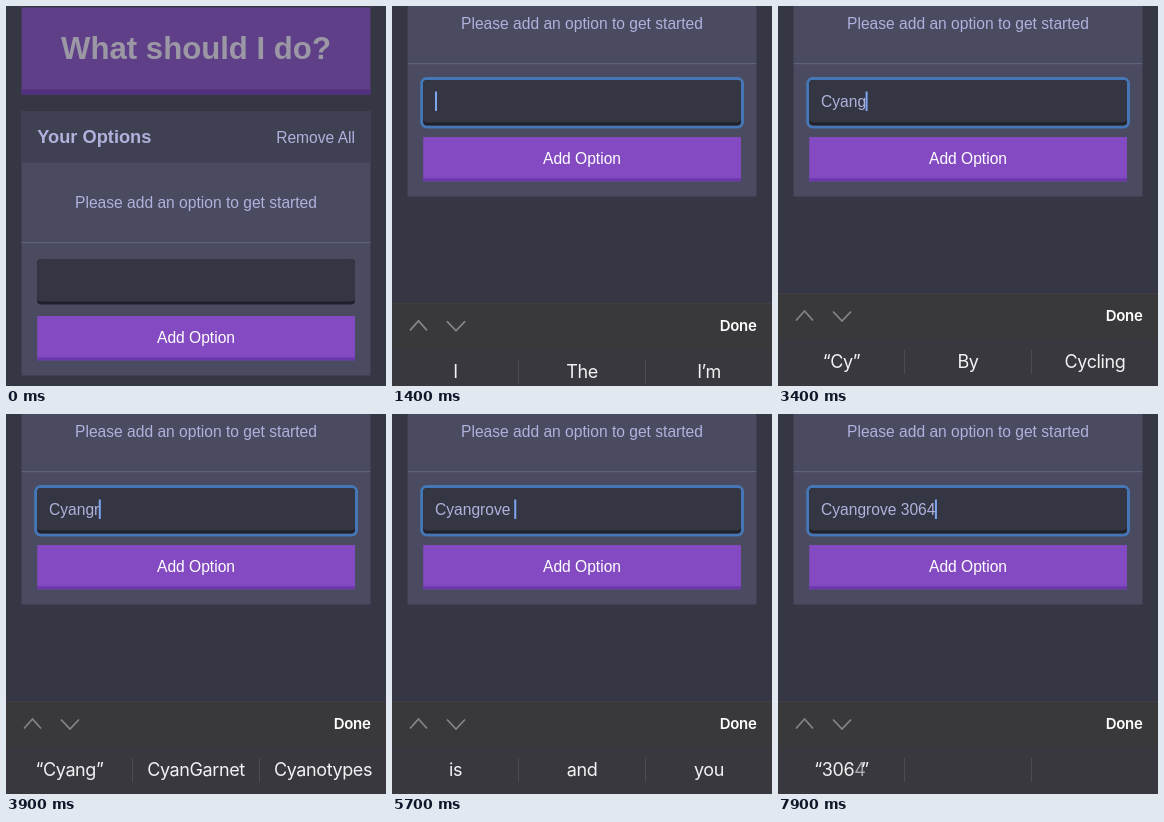
Animation, 380 px wide and 380 px high, one loop 8000 ms. Source, as an HTML page:

```html
<!DOCTYPE html>
<html lang="en">
<head>
<meta charset="utf-8">
<title>What should I do?</title>
<style>
  html, body { margin: 0; width: 100%; height: 100%; overflow: hidden; background: #363745; }
  svg { display: block; width: 100vw; height: 100vh; }
  text { font: 15.6px "Liberation Sans", Arial, sans-serif; fill: #b0b1dc; white-space: pre; }
  .mid { text-anchor: middle; }
  .end { text-anchor: end; }
  #page .title { font-size: 31.15px; font-weight: 700; fill: #9b97a5; }
  #page .head { font-size: 18.25px; font-weight: 700; }
  #page .label { fill: #fff; }
  #keys text { font: 18px Inter, Roboto, sans-serif; letter-spacing: -0.4px; fill: #f2f2f4; }
  #keys .done { font-size: 15px; font-weight: 600; letter-spacing: -0.3px; fill: #fff; }
</style>
</head>
<body>
<svg viewBox="0 0 380 380">
  <rect width="380" height="380" fill="#363745"/>
  <g id="page">
    <rect x="15.6" y="1.5" width="348.8" height="87" fill="#5f4088"/>
    <rect x="15.6" y="83.5" width="348.8" height="5" fill="#50307f"/>
    <text class="title mid" x="190" y="53">What should I do?</text>

    <rect x="15.6" y="105" width="348.8" height="264.5" fill="#4a4a60"/>
    <rect x="15.6" y="105" width="348.8" height="51.5" fill="#3f4052"/>
    <text class="head" x="31.2" y="137">Your Options</text>
    <text class="end" x="349" y="137">Remove All</text>
    <text class="mid" x="190" y="202.3">Please add an option to get started</text>
    <rect x="15.6" y="236" width="348.8" height="1.2" fill="#60617f"/>

    <rect id="ring" x="29.7" y="251.5" width="320.8" height="48.5" rx="5" fill="none" stroke="#4577b6" stroke-width="3"/>
    <rect x="31.2" y="253" width="317.8" height="45.5" rx="4" fill="#1f202a"/>
    <rect x="31.2" y="253" width="317.8" height="42.5" rx="4" fill="#353644"/>
    <rect id="mark" x="40.5" y="264.5" width="22" height="21" fill="#4a5070"/>
    <text id="typed" x="43" y="280.3"></text>
    <rect id="caret" y="264.5" width="2" height="19.5" fill="#7fa5ee"/>

    <rect x="31.2" y="310" width="317.8" height="44.3" fill="#844ac2"/>
    <rect x="31.2" y="351.3" width="317.8" height="3" fill="#6c37ab"/>
    <text class="label mid" x="190" y="336.5">Add Option</text>
  </g>
  <g id="keys">
    <rect y="287" width="380" height="500" fill="#39383e"/>
    <rect y="287" width="380" height="46" fill="#39393c"/>
    <rect y="287" width="380" height="1" fill="#404044"/>
    <path d="M18 314.5L26.5 305L35 314.5M55 305.5L64 315L73 305.5" fill="none" stroke="#858588" stroke-width="1.7"/>
    <text class="done end" x="364.5" y="315.3">Done</text>
    <path id="bars" d="M126.5 344V368M253.5 344V368" stroke="#4c4b52"/>
    <rect id="pick" x="127" y="337" width="126" height="37.5" rx="5" fill="#717073"/>
    <text id="left" y="362.3"></text>
    <text id="extra" y="362.3"></text>
    <text id="quote" y="362.3"></text>
    <text id="center" class="mid" x="190" y="362.3"></text>
    <text id="right" class="mid" x="317" y="362.3"></text>
  </g>
</svg>
<script>
const LOOP = 8000;
const PHRASE = "Cyangrove 3064";
const KEY_TIMES = [2300, 2600, 3000, 3200, 3400, 3800, 4100, 4600, 5000, 5500, 6600, 7000, 7300, 7600];
const HINTS = [
  [0, "I", "The", "I’m"],
  [2750, "“Cy”", "By", "Cycling"],
  [3500, "“Cyang”", "CyanGarnet", "Cyanotypes"],
  [4050, "“Cyangr”"],
  [4400, "“Cyangro”"],
  [4850, "“Cyangrov”"],
  [5200, "“Cyangrove”"],
  [5600, "is", "and", "you"],
  [6900, "“3”"],
  [7200, "“30”"],
  [7490, "“306”"],
  [7790, "“3064”"]
];
const PICK = [2750, 3000];
const FADES = [[1900, 2150], [6000, 6600]];

const el = {};
document.querySelectorAll("[id]").forEach(n => el[n.id] = n);
const clamp = v => Math.max(0, Math.min(1, v));
const mix = (a, b, p) => a + (b - a) * p;
const smooth = p => p * p * (3 - 2 * p);
const show = (n, on) => n.setAttribute("opacity", +on);

function put(n, s) {
  if (n.textContent !== s) n.textContent = s;
  return s ? n.getComputedTextLength() : 0;
}

// Damped slide of the keyboard, as a share still to travel
function slide(t) {
  const k = Math.max(0, t - 1105) * 0.0183;
  return (1 + k) * Math.exp(-k);
}

function drawLeft(word, before, age) {
  const quoted = word[0] === "“";
  const body = quoted ? word.slice(0, -1) : word;
  const grows = quoted && before === body.slice(0, -1) + "”";
  const p = grows ? clamp(age / 180) : 1;
  const stem = grows ? body.slice(0, -1) : body;
  const a = put(el.left, stem);
  const b = put(el.extra, grows ? body.slice(-1) : "");
  const c = put(el.quote, quoted ? "”" : "");
  const x = 63.5 - (a + b * p + c) / 2;
  el.left.setAttribute("x", x);
  el.extra.setAttribute("x", x + a);
  el.quote.setAttribute("x", x + a + b * p);
  show(el.extra, p);
}

function caretAlpha(t) {
  if (t < 1250) return 0;
  let a = 1;
  for (const [from, to] of FADES)
    if (t >= from && t < to + 150)
      a = t < to ? 1 - clamp((t - from) / 200) : to === 6600 ? 1 : (t - to) / 150;
  return a;
}

function render(t) {
  const scroll = 179 * smooth(clamp((t - 1100) / 290));
  el.page.setAttribute("transform", `translate(0 ${-scroll})`);
  el.keys.setAttribute("transform", `translate(0 ${340 * slide(t)})`);
  show(el.ring, t >= 1150);

  const count = KEY_TIMES.filter(k => t >= k).length;
  const width = put(el.typed, PHRASE.slice(0, count));
  el.caret.setAttribute("x", 43 + width - (count ? 0.5 : 0));
  show(el.caret, caretAlpha(t));

  const picked = t >= PICK[0] && t < PICK[1];
  show(el.mark, picked);
  show(el.pick, picked);
  show(el.bars, !picked);

  const i = HINTS.filter(h => t >= h[0]).length - 1;
  const [from, word, mid = "", last = ""] = HINTS[i];
  drawLeft(word, i ? HINTS[i - 1][1] : "", t - from);
  put(el.center, mid);
  put(el.right, last);
}

let start;
function tick(now) {
  if (start === undefined) start = now;
  render((now - start) % LOOP);
  requestAnimationFrame(tick);
}
render(0);
requestAnimationFrame(tick);
</script>
</body>
</html>
```
